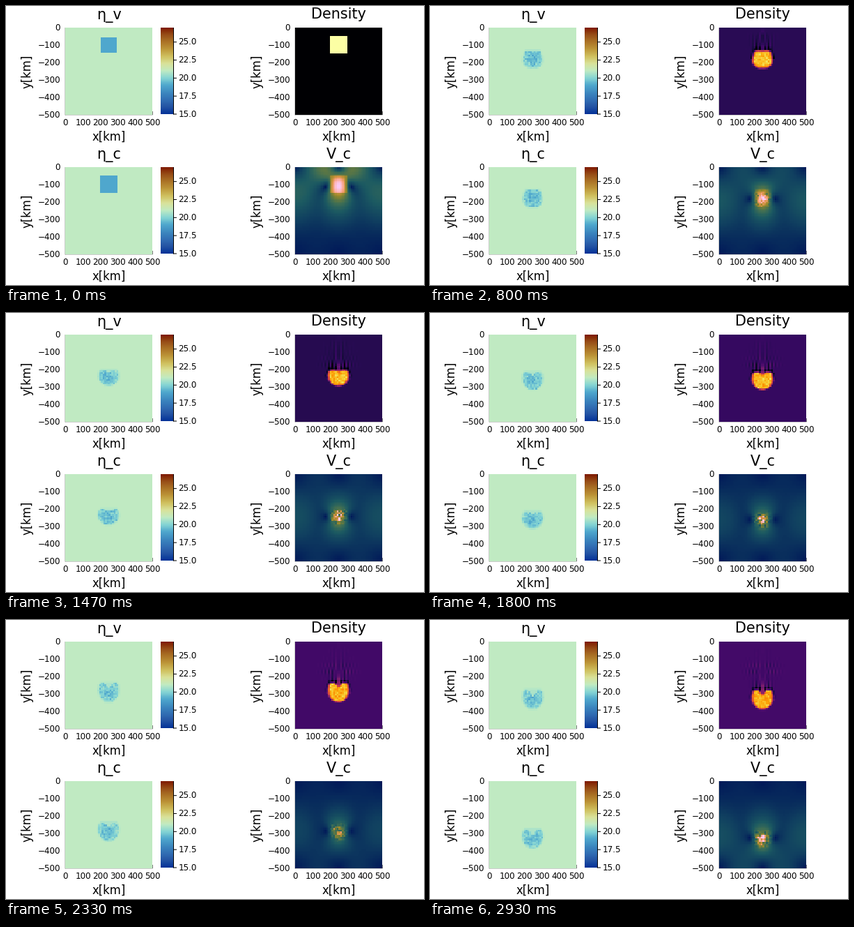
A matplotlib script for the animation above (3 s loop, 600 by 400 pixels).

```python
import matplotlib.pyplot as plt
import numpy as np
from matplotlib.animation import FuncAnimation
from matplotlib.colors import LinearSegmentedColormap
from matplotlib.patches import Rectangle

W, H, DPI = 600, 400, 100
FRAMES, LOOP_MS = 45, 3000
SIZE, N, BOX = 500.0, 50, 125

plt.rcParams["font.family"] = "DejaVu Sans"

ROMA = LinearSegmentedColormap.from_list("roma_like", [
    "#023198", "#2454A4", "#326FB4", "#3D89C0", "#4FA7CD", "#84D4D4", "#C0EBC3",
    "#D9E29A", "#D0C160", "#BE983A", "#AC7427", "#984F18", "#7E1900"])
BATLOW = LinearSegmentedColormap.from_list("batlow_like", [
    "#011959", "#103F60", "#1C5A62", "#3C6D56", "#687B3E",
    "#9D892B", "#D29343", "#F8A17B", "#FDB7BC", "#FACCFA"])

# Values over the loop
KEYS = [0, 1, 6, 17, 22, 31, 39, 44]
TRACKS = {
    "top": [50, 54, 76, 174, 200, 222, 255, 279],
    "bottom": [150, 156, 188, 267, 292, 334, 366, 392],
    "notch": [0, 0, 0, 4, 12, 26, 34, 38],
    "back": [0, .09, .115, .175, .14, .2, .205, .205],
    "body": [1, .84, .78, .9, .84, .85, .82, .82],
    "rough": [0, .3, 1, 1, 1, 1, 1, 1],
    "eta": [2, 1.75, 1.35, 1.3, 1.3, 1.3, 1.3, 1.3],
    "trail": [0, .1, .2, .26, .26, .24, .24, .24],
    "ripple": [0, 0, 0, .03, .06, .08, .09, .09],
    "gain": [.76, .76, .68, .52, .5, .32, .48, .5],
}

# Half-width of the block from its top (0) to its bottom (1)
LEVELS = [0, .15, .4, .6, .8, .92, 1]
SQUARE = [50, 50, 50, 50, 50, 50, 50]
BELL = [27, 32, 44, 58, 61, 57, 45]
BOWL = [46, 57, 61, 57, 46, 33, 18]

cells = (np.arange(N) + .5) * SIZE / N
nodes = np.arange(N + 1) * SIZE / N
CELL_X, CELL_D = np.meshgrid(cells - SIZE / 2, cells)
NODE_X, NODE_D = np.meshgrid(nodes - SIZE / 2, nodes)


def state(i):
    s = {name: np.interp(i, KEYS, vals) for name, vals in TRACKS.items()}
    s["mid"] = (s["top"] + s["bottom"]) / 2
    return s


def soft(v, w=10):
    return np.clip(v / w + .5, 0, 1)


def block(x, d, i, s, grow=0, w=10):
    """Coverage of the sinking block, 0 to 1."""
    t = (d - s["top"]) / (s["bottom"] - s["top"])
    to_bell = np.interp(i, [0, 6], [0, 1])
    to_bowl = np.interp(i, [6, 15], [0, 1])
    profile = (1 - to_bell) * np.array(SQUARE) + to_bell * np.array(BELL)
    profile = (1 - to_bowl) * profile + to_bowl * np.array(BOWL)
    half = np.interp(t, LEVELS, profile) + grow
    mask = (soft(half - abs(x), w) * soft(d - s["top"] + grow, w)
            * soft(s["bottom"] + grow - d, w))
    if s["notch"] > 1 and not grow:
        depth = s["notch"] * np.clip(1 - abs(x) / 26, 0, 1)
        mask = mask * soft(d - s["top"] - depth, w)
    return mask


def core(x, d, s, r):
    return np.exp(-(x ** 2 + (d - s["mid"]) ** 2) / (2 * r * r))


def noise(shape, seed, i):
    n = np.random.default_rng(seed).normal(size=shape)
    if i < 12:
        half = (shape[1] + 1) // 2
        n[:, -half:] = n[:, :half][:, ::-1]
    return n


def viscosity(x, d, i, s, seed):
    m = np.clip(2 * block(x, d, i, s) - 1, 0, 1)
    fringe = block(x, d, i, s, 4 * s["rough"]) * s["rough"] * .3
    n = np.clip(noise(x.shape, seed, i), -1.8, 1.8)
    shade = 1 + s["rough"] * (.55 * core(x, d, s, 30) - .35)
    return 21 - fringe * (1 - m) - m * (s["eta"] * shade + .34 * s["rough"] * n)


def density(x, d, i, s):
    m = block(x, d, i, s, w=10 + 8 * s["rough"])
    n = np.clip(noise(x.shape, 500 + i, i), -2, 2)
    up = s["top"] - d
    above = soft(up)
    near = np.exp(-np.clip(up, 0, None) / 55) * soft(d - 35)

    out = s["back"] + (s["body"] - s["back"]) * m + .04 * s["rough"] * n * m
    # Bright lower corners while the square turns into a bell
    corner = np.exp(-((abs(x) - 54) / 8) ** 2 - ((d - s["bottom"] + 32) / 20) ** 2)
    out += .35 * m * corner * np.interp(i, [0, 5, 10, 15], [0, 1, .4, 0])
    # Undershoot around the shoulders
    halo = block(x, d, i, s, 12) - m
    out -= .14 * s["rough"] * np.clip(halo, 0, 1) * (d < s["mid"])
    # Ringing left in the wake
    spread = 38 + .12 * np.clip(up, 0, None)
    wake = np.exp(-(x / spread) ** 2)
    wave = np.cos(2 * np.pi * abs(x) / 23 + up / 60)
    out += s["trail"] * near * above * wake * (wave - .25)
    stem = np.exp(-(x / 11) ** 2) * soft(up + s["notch"]) * np.exp(-np.clip(up, 0, None) / 45)
    out += .38 * np.interp(i, [6, 16], [0, 1]) * stem * (1 - m)
    band = np.exp(-(x / 85) ** 2 - ((d - 160) / 40) ** 2) * above
    out += s["ripple"] * band * np.cos(2 * np.pi * x / 21.5) * np.cos(d / 14)
    return np.clip(out, 0, 1)


# Free-slip Stokes flow by sine series
modes = np.arange(1, 31)
COS = np.cos(np.pi * np.outer(cells, modes) / SIZE)
SIN = np.sin(np.pi * np.outer(cells, modes) / SIZE)
MX, MD = np.meshgrid(modes, modes)


def speed(x, d, i, s):
    m = block(x, d, i, s)
    psi = MX * (SIN.T @ m @ COS) / (MX ** 2 + MD ** 2) ** 2
    vx = COS @ (MD * psi) @ SIN.T
    vd = SIN @ (MX * psi) @ COS.T

    # Inner circulation of the soft block pulls the eddies to 75 km
    r, dy = 45, d - s["mid"]
    bell = core(x, d, s, r)
    edge = (1 - (75 / r) ** 2) * np.exp(-(75 / r) ** 2 / 2)
    row = int(s["mid"] // 10)
    b = -vd[row, int((SIZE / 2 - 75) // 10)] / edge
    vd = vd + b * (1 - x ** 2 / r ** 2) * bell
    vx = vx - b * x * dy / r ** 2 * bell

    v = np.hypot(vx, vd)
    v *= s["gain"] / v.max()
    # The soft block moves faster than its rim, ever more unevenly
    n = np.clip(noise(x.shape, 900 + i, i), -2, 2.4)
    stripes = np.cos(2 * np.pi * x / 25) * np.interp(i, [0, 5, 12], [0, .2, 0])
    late = np.interp(i, [0, 6, 17], [0, .08, .5]) * core(x, d, s, 35)
    peak = np.interp(i, [6, 17], [0, .75]) * core(x, d, s, 18)
    lift = np.interp(i, [0, 6, 17], [.3, .3, .05])
    return np.clip(v * (1 + m * (lift + late * n + peak + stripes)), 0, 1)


fig = plt.figure(figsize=(W / DPI, H / DPI), dpi=DPI, facecolor="white")
ax = fig.add_axes([0, 0, 1, 1])
ax.axis("off")


def text(x, y, label, px, **kw):
    ax.text(x, y, label, fontsize=px * 72 / DPI, color="black", **kw)


def line(x0, y0, x1, y1, alpha=1):
    ax.plot([x0, x1], [y0, y1], color="black", lw=.72, alpha=alpha, zorder=1,
            solid_capstyle="butt", snap=False)


def image(data, x0, y0, x1, y1, cmap, lo, hi):
    return ax.imshow(data, extent=(x0, x1, y1, y0), cmap=cmap, vmin=lo, vmax=hi,
                     interpolation="nearest", aspect="auto", zorder=2)


def panel(x, y, title, cmap, lo, hi, n=N):
    pad = 1.25 if n > N else 0
    im = image(np.zeros((n, n)), x - pad, y - pad, x + BOX + pad, y + BOX + pad, cmap, lo, hi)
    im.set_clip_path(Rectangle((x, y), BOX, BOX, transform=ax.transData))
    line(x, y, x, y + BOX + .5, .4)
    line(x, y + BOX, x + BOX + .5, y + BOX, .4)
    line(x + BOX, y + BOX - 5, x + BOX, y + BOX)
    for k in range(6):
        text(x + 25 * k + .5, y + 140.1, str(100 * k), 12, ha="center")
        text(x - 7, y + 25 * k + 3.7, f"\u2212{100 * k}" if k else "0", 12, ha="right")
    text(x + 62.5, y - 12.5, title, 20.8, ha="center")
    text(x + 63, y + 161.5, "x[km]", 16.5, ha="center")
    text(x - 54.5, y + 62.5, "y[km]", 16.5, ha="center", va="center", rotation=90)
    return im


def colorbar(x, y):
    image(np.linspace(27, 15, 256)[:, None], x, y, x + 18, y + 124, ROMA, 15, 27)
    line(x + 18.5, y, x + 18.5, y + 124.5)
    for v in (15, 17.5, 20, 22.5, 25):
        ty = y + 124 * (27 - v) / 12
        line(x + 18, ty, x + 23, ty)
        text(x + 25.5, ty + 3.7, f"{v:.1f}", 12)


eta_v = panel(85, 31, "η_v", ROMA, 15, 27, N + 1)
rho = panel(415, 31, "Density", "inferno", 0, 1)
eta_c = panel(85, 231, "η_c", ROMA, 15, 27)
vel = panel(415, 231, "V_c", BATLOW, 0, 1)
colorbar(222, 31)
colorbar(222, 231)
ax.set_xlim(0, W)
ax.set_ylim(H, 0)


def update(i):
    s = state(i)
    eta_v.set_data(viscosity(NODE_X, NODE_D, i, s, 100 + i))
    eta_c.set_data(viscosity(CELL_X, CELL_D, i, s, 300 + i))
    rho.set_data(density(CELL_X, CELL_D, i, s))
    vel.set_data(speed(CELL_X, CELL_D, i, s))
    return eta_v, eta_c, rho, vel


anim = FuncAnimation(fig, update, frames=FRAMES, interval=LOOP_MS / FRAMES,
                     repeat=True, repeat_delay=0, blit=False)
plt.show()
```
